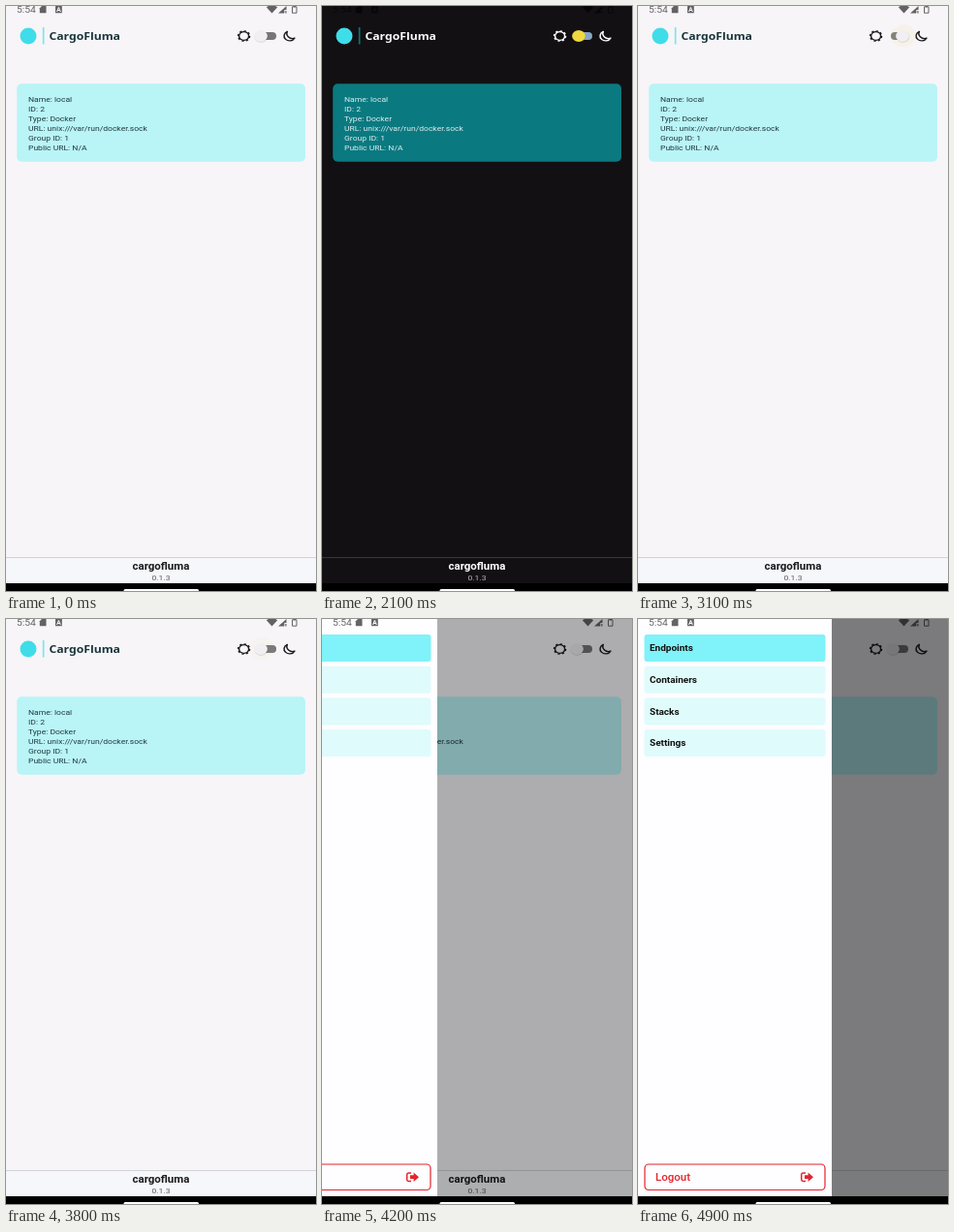
These frames come from a looping animation (320 px wide and 604 px high, 5 s). An HTML page:

```html
<!DOCTYPE html>
<html lang="en">
<head>
<meta charset="utf-8">
<title>CargoFluma</title>
<style>
html, body { margin: 0; width: 100%; height: 100%; overflow: hidden; background: #000; }
svg { display: block; width: 100%; height: 100%; font-family: Roboto, sans-serif; }

/* The screen is shown a little wider than tall, type and icons alike. */
text, .icon { transform: scaleX(1.15); transform-box: fill-box; transform-origin: left; }
.icon, .centered { transform-origin: center; }

/* Everything steps at 10 pictures per second: 2% is 100 ms. */
#stage, #track, #thumb, #ripple { animation: 5s step-end infinite; }
#stage { animation-name: theme, open; }
#track { animation-name: track; }
#thumb { animation-name: slide; }
#ripple { animation-name: ripple; }

@keyframes theme {
  0%, 62%, 100% {
    --bg: #f7f5f8; --bar: #f6f7fa; --line: #d3d2d5; --fg: #1c1b1e; --title: #17353a;
    --card: #b9f4f7; --text: #203a3d; --rule: #78e6ee; --version: #5c5b5e; --knob: #f1eff1;
  }
  42% {
    --bg: #121013; --bar: #121013; --line: #39373a; --fg: #fff; --title: #fff;
    --card: #0a7a80; --text: #dcecee; --rule: #0b7478; --version: #b9b8ba; --knob: #f0d83f;
  }
}
@keyframes open {
  0%, 100% { --open: 0; }
  80% { --open: .06; }
  82% { --open: .3; }
  84% { --open: .595; }
  86% { --open: .8; }
  88% { --open: .91; }
  90% { --open: .965; }
  92% { --open: .99; }
  94% { --open: 1; }
}
@keyframes track {
  0%, 62%, 100% { fill: #767577; }
  42% { fill: #86a5c6; }
  44% { fill: #81b0ff; }
  60% { fill: #999896; }
}
@keyframes slide {
  0%, 66%, 100% { transform: none; }
  42% { transform: translateX(2px); }
  44% { transform: translateX(9px); }
  46% { transform: translateX(14px); }
  62% { transform: translateX(10px); }
  64% { transform: translateX(3px); }
}
@keyframes ripple {
  0%, 50%, 78%, 100% { opacity: 0; }
  44% { opacity: .06; }
  62% { opacity: .12; }
  68% { opacity: .09; }
  74% { opacity: .06; }
}

.bg { fill: var(--bg); }
.fg { fill: none; stroke: var(--fg); stroke-width: 1.3; }
.info { fill: var(--text); font-size: 7.45px; }
.title { fill: var(--title); font: 600 10.6px "Noto Sans", sans-serif; }
.name { fill: var(--fg); font-size: 10px; font-weight: 700; text-anchor: middle; }
.version { fill: var(--version); font-size: 7.45px; text-anchor: middle; }
.status { fill: #000; opacity: .6; font-size: 9px; }
.menu { font-size: 8.7px; font-weight: 700; fill: #111; }
.item { fill: #dffbfb; }
.active { fill: #80f2f9; }
#scrim { opacity: calc(var(--open) * .5); }
#drawer { transform: translateX(calc((var(--open) - 1) * 200px)); }
</style>
</head>
<body>
<svg id="stage" viewBox="0 0 320 604" preserveAspectRatio="none">
  <rect class="bg" width="320" height="604"/>

  <!-- header -->
  <circle cx="23" cy="31" r="8.5" fill="#3fdde9"/>
  <rect x="37.8" y="22" width="1.7" height="17.5" fill="var(--rule)"/>
  <text class="title" x="44.5" y="34.8">CargoFluma</text>
  <g class="icon fg">
    <circle cx="245.6" cy="31" r="4.4"/>
    <circle cx="245.6" cy="31" r="5.2" pathLength="16" stroke-dasharray="1 1"/>
  </g>
  <path class="icon fg" d="M290.6 26.4a5 5 0 1 0 6.600 6.800a5.200 5.200 0 0 1-6.600-6.800z" stroke-linejoin="round"/>
  <rect id="track" x="261" y="27" width="18" height="8" rx="4"/>
  <g id="thumb">
    <ellipse id="ripple" cx="264" cy="30.7" rx="13" ry="12" fill="#efe48a"/>
    <ellipse cx="263.3" cy="31.6" rx="7" ry="6.200" opacity=".14"/>
    <ellipse cx="263" cy="31" rx="6.900" ry="6.100" fill="var(--knob)"/>
  </g>

  <!-- endpoint card -->
  <rect x="11.2" y="80.300" width="297.800" height="80.500" rx="5" fill="var(--card)"/>
  <g class="info">
    <text x="23" y="98.6">Name: local</text>
    <text x="23" y="108.6">ID: 2</text>
    <text x="23" y="118.6">Type: Docker</text>
    <text x="23" y="128.6">URL: unix:///var/run/docker.sock</text>
    <text x="23" y="138.6">Group ID: 1</text>
    <text x="23" y="148.6">Public URL: N/A</text>
  </g>

  <!-- footer -->
  <rect y="570" width="320" height="26" fill="var(--bar)"/>
  <rect y="569" width="320" height="1" fill="var(--line)"/>
  <text class="name centered" x="160" y="581.6">cargofluma</text>
  <text class="version centered" x="160" y="592.6">0.1.3</text>

  <rect id="scrim" width="320" height="596"/>

  <g id="drawer">
    <rect width="200" height="596" fill="#fefdff"/>
    <rect class="active" x="6.5" y="16" width="187" height="28" rx="3"/>
    <rect class="item" x="6.5" y="48.7" width="187" height="28" rx="3"/>
    <rect class="item" x="6.5" y="81.4" width="187" height="28" rx="3"/>
    <rect class="item" x="6.5" y="114" width="187" height="28" rx="3"/>
    <g class="menu">
      <text x="12" y="33.2">Endpoints</text>
      <text x="12" y="65.9">Containers</text>
      <text x="12" y="98.6">Stacks</text>
      <text x="12" y="131.2">Settings</text>
    </g>
    <rect x="7" y="563" width="186" height="26.5" rx="4" fill="none" stroke="#e3242b" stroke-width="1.2"/>
    <text x="18" y="580" font-size="10" font-weight="500" fill="#e3242b">Logout</text>
    <path d="M173 572h-2.6a1.7 1.7 0 0 0-1.7 1.7v5a1.7 1.7 0 0 0 1.7 1.7h2.6" fill="none" stroke="#e3242b" stroke-width="1.5"/>
    <path d="M172 574.3h3.6v-2.9l5.4 4.8-5.4 4.8v-2.9h-3.6z" fill="#e3242b"/>
  </g>

  <!-- status bar -->
  <g class="status">
    <text x="11" y="6.7">5:54</text>
    <path d="M37 0h4.5v7.3h-6.7V2.2z"/>
    <path fill-rule="evenodd" d="M51 0h6.8v7.3H51zM52 6h1l.4-1h2l.4 1h1L54.9 1.3h-1zM53.8 4l.6-1.5.6 1.5z"/>
    <path d="M268.8 1.2Q274.5-2.6 280.2 1.2L274.5 7.5z"/>
    <path d="M281 7.5L289.5 0v4h-2.2v3.5zM288.3 5h1.2v2.5h-1.2z"/>
    <path d="M295.5.8h4.5v6.4h-4.5zM296.8 0h2v.8h-2z" fill="none" stroke="#000" stroke-width="1"/>
  </g>

  <!-- navigation bar -->
  <rect y="596" width="320" height="8"/>
  <rect x="121.5" y="602" width="77.5" height="4" rx="1.5" fill="#fff"/>
</svg>
</body>
</html>
```
